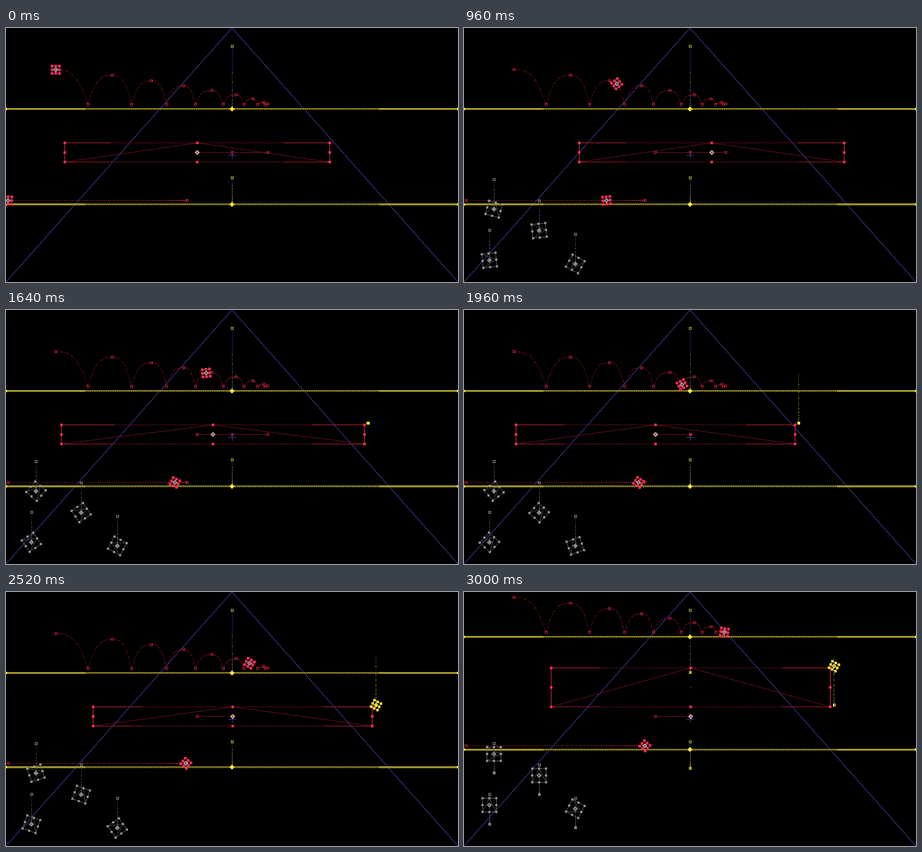
Recreate the animation shown at these times as an HTML page with a canvas. Size 800 by 450 pixels, loop 3040 ms.

```html
<!DOCTYPE html>
<html>
<head>
<meta charset="utf-8">
<style>
html, body { margin: 0; width: 100%; height: 100%; overflow: hidden; background: #000; }
canvas { display: block; }
</style>
</head>
<body>
<canvas id="stage" width="800" height="450"></canvas>
<script>
const g = document.getElementById('stage').getContext('2d');
const LOOP = 3040, STEP = 40, END = 3000;
const RED = '#ff2f57', MID_RED = '#c4243c', DIM_RED = '#7c1622';
const YELLOW = '#fbea3e', DIM_YELLOW = '#857b22';
const GRAY = '#959595', DIM_GRAY = '#646464', PURPLE = '#4b3ba4';

// Progress from time a to time b, clamped to 0..1; b may lie before a.
const ramp = (t, a, b) => Math.max(0, Math.min(1, (t - a) / (b - a)));
// Share of the way still to go while slowing down to a stop at time stop.
const rest = (t, rate, stop, power) => Math.exp(-rate * t / 1000) * (1 - ramp(t, 0, stop) ** power);
// Accelerating rise that reaches height at the end of the loop.
const rise = (start, height, power) => t => height * ramp(t, start, END) ** power;

const bounceX = t => 463 - 375 * rest(t, 0.67, LOOP, 3.3);
const rollX = t => 320 - 316.5 * rest(t, 1.6, 2720, 5);
const barX = t => t < 1200
  ? 338.5 + 125 * t / 1200
  : 339 + 62.3 * (ramp(t, 1960, 1230) + ramp(t, 1960, 2520));
const barHalf = t => t < 1200 ? 234.5 : 247 + 45 * ramp(t, 1960, 1280);
const cubeSize = t => ramp(t, 1640, 1280) + ramp(t, 1960, 2360);
const liftTop = rise(2480, 64, 3.94);
const liftFloor = rise(1960, 33.5, 4.4);
const liftBox = rise(2480, 34, 2.8);
const liftBar = rise(2480, 69, 2.6);

// The bounce touches the ground at these places, with lower and lower peaks between.
const hits = [145, 222, 284, 335, 384, 421, 445, 458];
const keys = [[88, 74]];
hits.forEach((x, i) => {
  const next = hits[i + 1], n = i + 1;
  keys.push([x, 136]);
  keys.push(next ? [(x + next) / 2 + 4, 74 + 10.4 * n - 0.3 * n * n] : [463, 135]);
});
function bounceY(x) {
  let i = 0;
  while (i < keys.length - 2 && x > keys[i + 1][0]) i++;
  const [peak, ground] = i % 2 ? [keys[i + 1], keys[i]] : [keys[i], keys[i + 1]];
  const u = Math.min(1, Math.abs((x - peak[0]) / (ground[0] - peak[0])));
  return peak[1] + (ground[1] - peak[1]) * u ** 3;
}

function line(color, pts, dash = [], width = 1) {
  g.strokeStyle = color;
  g.lineWidth = width;
  g.setLineDash(dash);
  g.beginPath();
  pts.forEach(p => g.lineTo(p[0], p[1]));
  g.stroke();
  g.setLineDash([]);
}
function square(color, x, y, s = 4.4) {
  g.fillStyle = color;
  g.fillRect(x - s / 2, y - s / 2, s, s);
}
function key(color, x, y) {
  g.strokeStyle = color;
  g.lineWidth = 0.9;
  g.strokeRect(Math.round(x) - 1.5, Math.round(y) - 2.5, 4, 4);
  square(color, Math.round(x) + 0.5, Math.round(y) - 0.5, 1);
}
function anchor(color, x, y, r = 3.8) {
  line(color, [[x, y - r], [x + r, y], [x, y + r], [x - r, y], [x, y - r]], [], 1.2);
  g.beginPath();
  g.arc(x, y, 1.8, 0, 7);
  g.stroke();
}
function frames(color, point) {
  for (let t = 0; t < LOOP; t += STEP) square(color, ...point(t), 1.2);
}

// Rotated square with eight handles and an optional triangle inside.
function box(x, y, half, deg, color, side, size, triangle) {
  const c = Math.cos(deg * Math.PI / 180) * half, s = Math.sin(deg * Math.PI / 180) * half;
  const p = (a, b) => [x + a * c - b * s, y + a * s + b * c];
  line(side, [p(-1, -1), p(1, -1), p(1, 1), p(-1, 1), p(-1, -1)]);
  if (triangle) line(side, [p(-1, 1), p(0, -1), p(1, 1)], [], 0.8);
  for (let a = -1; a < 2; a++)
    for (let b = -1; b < 2; b++)
      if (a || b) square(color, ...p(a, b), size);
}

// Vertical move with its keys and one dot per frame.
function track(x, top, bottom, lift, color, link) {
  line(link, [[x + 0.5, top], [x + 0.5, bottom]], [2, 1], 0.8);
  frames(color, t => [x + 0.5, bottom - lift(t)]);
  key(color, x, top);
  if (lift(now) > 3) key(color, x, bottom);
}

// Edge whose outer parts are brighter than the middle.
function edge(x0, x1, y, bright, dim, dash) {
  const w = (x1 - x0) * 0.175;
  line(dim, [[x0, y], [x1, y]], dash);
  line(bright, [[x0, y], [x0 + w, y]]);
  line(bright, [[x1 - w, y], [x1, y]]);
}

function ground(y) {
  const row = Math.round(y) + 0.5;
  line('#4f4815', [[0, row], [800, row]]);
  edge(0, 800, row - 1, YELLOW, '#b5a82d', []);
  edge(0, 800, row + 1, '#d8c936', '#a0932a', [3, 1]);
  square(YELLOW, 0, y + 0.5, 4);
  square(YELLOW, 800, y + 0.5, 4);
  g.fillStyle = YELLOW;
  g.beginPath();
  [[0, -4.5], [4.5, 0], [0, 4.5], [-4.5, 0]].forEach(([a, b]) => g.lineTo(400 + a, y + 0.5 + b));
  g.fill();
}

function drawBouncer(t) {
  const up = liftTop(t), arc = [];
  for (let x = 88; x <= 463; x++) arc.push([x, bounceY(x) - up]);
  line(DIM_RED, arc, [2, 1], 0.9);
  frames(MID_RED, f => [bounceX(f), bounceY(bounceX(f)) - up]);
  keys.forEach(k => key(MID_RED, k[0], k[1] - up));
  const x = bounceX(t), y = bounceY(x) - up;
  box(x, y, 6.5, (88 - x) * 0.7, RED, DIM_RED, 4.6);
  anchor('#b9a0a6', x, y);
}

function drawRoller(t) {
  const x = rollX(t), y = Math.round(306 - liftFloor(t)) - 0.5;
  line(DIM_RED, [[3, y], [320, y]], [2, 1], 0.9);
  frames(MID_RED, f => [rollX(f), y]);
  key(MID_RED, 3, y);
  key(MID_RED, 320, y);
  box(x, y, 6.5, x * 0.69, RED, DIM_RED, 4.6);
  anchor('#b9a0a6', x, y);
}

function drawBar(t) {
  const cx = barX(t), half = barHalf(t), left = cx - half, right = cx + half;
  const top = Math.round(203 - liftBar(t)) + 0.5, bottom = Math.round(237 - liftBox(t)) + 0.5;
  const mid = (top + bottom) / 2;
  line(DIM_RED, [[left, bottom], [cx, top], [right, bottom]], [], 0.9);
  edge(left, right, top, MID_RED, DIM_RED, [2, 1]);
  edge(left, right, bottom, '#a81e32', DIM_RED, [2, 1]);
  for (const x of [left, right]) {
    line(MID_RED, [[x, top], [x, bottom]], [], 1.3);
    [top, mid, bottom].forEach(y => square(RED, x, y));
  }
  square(RED, cx, top);
  square(RED, cx, bottom);
  square(RED, cx, mid, 1.5);

  const end = t < 1700 ? 463 : 401;
  line(DIM_RED, [[338, 220.5], [end, 220.5]], [2, 1], 0.9);
  for (let x = 338; x < end; x += 5.2) square(MID_RED, x, 220.5, 1.2);
  [338, 400, end].forEach(x => key(MID_RED, x, 220.5));
  anchor('#c9b0a4', cx, 220.5);
  if (t >= 1200) drawCube(t, right + 6.5);
}

// Yellow square riding on the bar's right end
function drawCube(t, x) {
  const y = 200.5 - liftBar(t), size = cubeSize(t);
  if (t >= 1700) {
    line(DIM_YELLOW, [[x, 114], [x, 201]], [2, 2], 0.8);
    frames(YELLOW, f => [x, 201 - liftBar(f)]);
    if (t > 2600) key(YELLOW, x, 201);
  }
  box(x, y, 6.5 * size, 28 * ramp(t, 1960, 2520), YELLOW, DIM_YELLOW, 4.4);
  if (size > 0.3) anchor(YELLOW, x, y, 3.5);
}

function drawSpinners(t) {
  const left = END - t, back = left * 0.041;
  const spinners = [
    [53, 321, 90 - left * 0.0367],
    [133, 359, back],
    [45, 411.5, back],
    [197, 418, 118 - left * 0.132]
  ];
  for (const [x, y, deg] of spinners) {
    track(x, y - 52.5, y, liftBox, GRAY, '#3f3a62');
    box(x, y - liftBox(t), 12.2, deg, GRAY, DIM_GRAY, 3.8, true);
    anchor(GRAY, x, y - liftBox(t));
  }
}

let now = 0;
function draw() {
  g.fillStyle = '#000';
  g.fillRect(0, 0, 800, 450);
  line(PURPLE, [[0, 450], [400, 0], [800, 450]], [], 1.1);
  line(PURPLE, [[393, 225.5], [407, 225.5]]);
  line(PURPLE, [[400.5, 219], [400.5, 232]]);

  track(400, 33, 143, liftTop, '#d3c536', PURPLE);
  track(400, 265.5, 312.5, liftFloor, '#d3c536', PURPLE);
  ground(143 - liftTop(now));
  ground(312 - liftFloor(now));
  drawBouncer(now);
  drawBar(now);
  drawRoller(now);
  if (now >= 280) drawSpinners(now);
}

function tick() {
  now = Math.floor(performance.now() % LOOP / STEP) * STEP;
  draw();
  requestAnimationFrame(tick);
}
tick();
</script>
</body>
</html>
```
